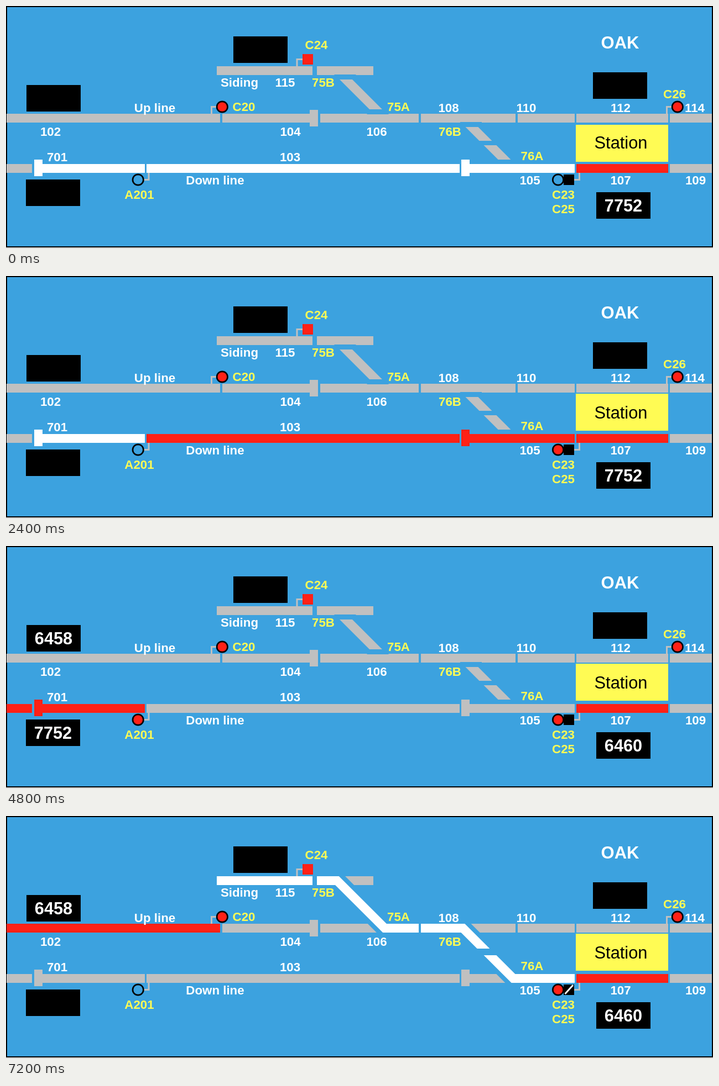
An HTML page with a canvas that plays this animation: 1278x438 px, repeating every 8 s.

```html
<!DOCTYPE html>
<html lang="en">
<head>
<meta charset="utf-8">
<title>Signalling panel</title>
<style>
html, body { margin: 0; width: 100%; height: 100%; overflow: hidden; background: #000; }
canvas, svg { position: absolute; left: 0; top: 0; width: 1278px; height: 438px; }
text { font-family: "Liberation Sans", Arial, sans-serif; font-weight: bold; text-anchor: middle; }
</style>
</head>
<body>
<canvas id="panel" width="1278" height="438"></canvas>
<svg id="labels" viewBox="0 0 1278 438"></svg>
<script>
const BLUE = '#3ca2df', GREY = '#c0c0c0', RED = '#ff2116', YELLOW = '#fffb54', WHITE = '#fff', BLACK = '#000';
const STEP = 1200, LOOP = 8000;
const SIDING = 117, UP = 203, DOWN = 294;   // centre lines
const TRACK = 16, CLEAR = 8;                // track width, space beside it
const LEFT = 1, RIGHT = 1276, PLATFORM = 1111;
const ctx = document.getElementById('panel').getContext('2d');
const svg = document.getElementById('labels');

// x and y are the centre of the capitals
function label(str, x, y, fill = WHITE, size = 22.3, weight = 'bold') {
  const el = document.createElementNS('http://www.w3.org/2000/svg', 'text');
  el.setAttribute('x', x);
  el.setAttribute('y', y + size * 0.345);
  el.setAttribute('font-size', size);
  el.setAttribute('fill', fill);
  el.style.fontWeight = weight;
  el.textContent = str;
  svg.append(el);
  return el;
}

function labelRow(y, places, fill) {
  for (const str in places) label(str, places[str], y, fill);
}

labelRow(SIDING + 21.5, { 'Siding': 422, '115': 504.5 });
labelRow(UP - 18.5, { 'Up line': 269, '108': 800, '110': 940.5, '112': PLATFORM, '114': 1245 });
labelRow(UP + 24, { '102': 80.5, '104': 514, '106': 670 });
labelRow(DOWN - 21, { '701': 92.5, '103': 513.5 });
labelRow(DOWN + 21, { 'Down line': 378, '105': 947, '107': PLATFORM, '109': 1246.5 });

label('C24', 561, SIDING - 46.5, YELLOW);
label('75B', 573.5, SIDING + 21.5, YELLOW);
label('C26', 1208.5, UP - 43.5, YELLOW);
labelRow(UP - 21, { 'C20': 430, '75A': 709.5 }, YELLOW);
label('76B', 802.5, UP + 24, YELLOW);
label('76A', 951, DOWN - 23, YELLOW);
labelRow(DOWN + 47, { 'C23': 1007.5, 'A201': 241 }, YELLOW);
label('C25', 1007.5, DOWN + 73.5, YELLOW);

label('OAK', 1110, 66, WHITE, 31);
label('Station', PLATFORM + 0.5, 247.5, BLACK, 30.8, 'normal');

function trainBox(x, y) {
  const text = label('', x, y, WHITE, 30.7);
  return number => {
    box(Math.round(x - 49), Math.round(y - 24), 98, 48, BLACK);
    text.textContent = number;
  };
}
const sidingTrain = trainBox(460, 79), upTrain = trainBox(86, 167), downTrain = trainBox(85, 338);
const farTrain = trainBox(1110, 144), platformTrain = trainBox(1116, 361);

function box(x, y, w, h, fill) {
  ctx.fillStyle = fill;
  ctx.fillRect(x, y, w, h);
}

function line(color, width, ...p) {
  ctx.strokeStyle = color;
  ctx.lineWidth = width;
  ctx.beginPath();
  for (let i = 0; i < p.length; i += 2) ctx.lineTo(p[i], p[i + 1]);
  ctx.stroke();
}

const track = (y, x1, x2, fill = GREY) => box(x1, y - TRACK / 2, x2 - x1, TRACK, fill);
const block = (x, y, fill = GREY) => box(x, y, 15, 30, fill);

function joints(y, w, ...xs) {
  for (const x of xs) box(x, y - TRACK / 2, w, TRACK, BLUE);
}

// A 45 degree link that leaves the line y1 at x and joins y2
function crossover(y1, y2, x, from, to, set) {
  const end = x + y2 - y1;
  if (set) {
    const path = [from, y1, x, y1, end, y2, to, y2];
    line(BLUE, TRACK + 2 * CLEAR, ...path);
    line(WHITE, TRACK, ...path);
    return;
  }
  line(GREY, TRACK, x, y1, end, y2);
  const cut = TRACK / 2 + CLEAR;
  track(y1, x - 20, x + 40);
  track(y2, end - 40, end + 20);
  box(x - 5, y1 + cut - 9, 39, 9, BLUE);
  box(end - 32, y2 - cut, 39, 9, BLUE);
}

function lamp(x, y, fill) {
  ctx.beginPath();
  ctx.arc(x, y, 9.7, 0, Math.PI * 2);
  ctx.fillStyle = fill;
  ctx.fill();
  line.call;
  ctx.strokeStyle = BLACK;
  ctx.lineWidth = 2.7;
  ctx.stroke();
}

const square = (x, y, fill) => box(Math.round(x - 9.5), Math.round(y - 9.5), 19, 19, fill);

// dir 1 stands above the line facing right, -1 below it facing left
function signal(x, y, dir, head, fill) {
  const top = y - dir * 20.5;
  line(GREY, 3, x, y - dir * TRACK / 2, x, top, x + dir * 12, top);
  head(x + dir * 19.3, top, fill);
}

function draw(step) {
  const set = step >= 5;
  const pick = colors => ({ w: WHITE, r: RED, g: GREY, b: BLUE })[colors[step]];
  const c701 = pick('wwwrrgg'), c103 = pick('wwrrggg'), c105 = pick('wrrgggg');

  box(0, 0, 1278, 437, BLACK);
  box(0, 437, 1278, 1, WHITE);
  box(2, 2, RIGHT - 2, 433, BLUE);

  track(SIDING, 381, 664);
  track(UP, LEFT, RIGHT);
  track(UP, LEFT, 387, pick('ggggggr'));
  track(DOWN, LEFT, RIGHT);
  track(DOWN, LEFT, 47, pick('ggggrgg'));
  track(DOWN, 51, 251, c701);
  track(DOWN, 254, 820, c103);
  track(DOWN, 823, 1028, c105);
  track(DOWN, 1031, 1197, pick('rrrgrrr'));

  if (set) track(SIDING, 381, 562, WHITE);
  crossover(SIDING, UP, 598.5, 562, 747, set);
  crossover(UP, DOWN, 826, 749, 1028, set);
  if (!set) track(DOWN, 838, 1028, c105);
  const gap = set ? 240 : 244;
  box(845, gap, 50, 252 - gap, BLUE);

  joints(SIDING, 8, 554);
  joints(UP, 4, 387, 564, 746, 921);
  joints(UP, 3, 1028, 1197);
  joints(DOWN, 4, 47);
  joints(DOWN, 3, 251, 820, 1028, 1197);
  block(549, UP - 15);
  block(51, DOWN - 16, c701);
  block(823, DOWN - 16, c105);

  box(PLATFORM - 81, step < 2 ? 215 : 213, 167, 67, YELLOW);

  signal(371.5, UP, 1, lamp, RED);
  signal(526, SIDING, 1, square, RED);
  signal(1194.5, UP, 1, lamp, RED);
  signal(258, DOWN, -1, lamp, pick('bbbrrbb'));
  signal(1036.5, DOWN, -1, square, BLACK);
  lamp(998, DOWN + 20.5, pick('brrrrrr'));
  if (set) line(WHITE, 3, 1010.5, 322, 1025, 306);

  sidingTrain('');
  farTrain('');
  upTrain(step >= 4 ? '6458' : '');
  downTrain(step === 3 || step === 4 ? '7752' : '');
  platformTrain(step < 3 ? '7752' : '6460');
}

let shown = -1;
const start = performance.now();
function tick(now) {
  const step = Math.floor(Math.max(0, now - start) % LOOP / STEP);
  if (step !== shown) draw(shown = step);
  requestAnimationFrame(tick);
}
tick(start);
</script>
</body>
</html>
```
